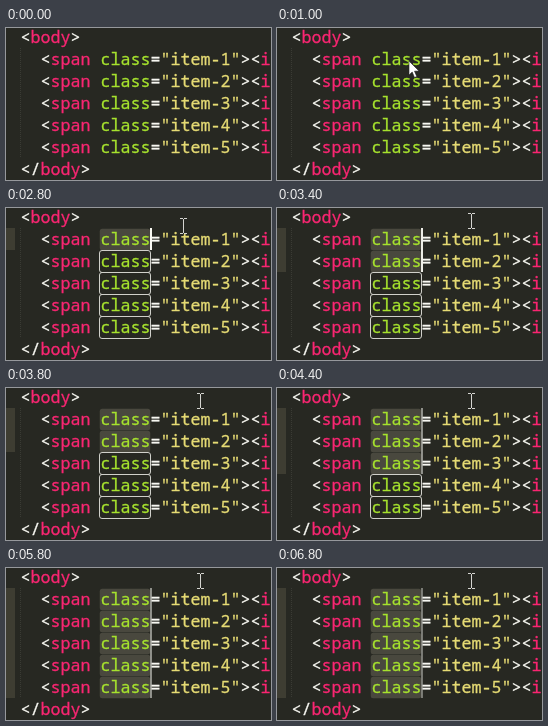
An HTML page with a canvas for the animation above (7000 ms loop, 265 by 152 pixels).

```html
<!DOCTYPE html>
<html lang="en">
<head>
<meta charset="utf-8">
<title>Multiple selection</title>
<style>
html, body { margin: 0; width: 100%; height: 100%; overflow: hidden; background: #272822; }
canvas { display: block; width: 265px; height: 152px; }
</style>
</head>
<body>
<canvas id="stage"></canvas>
<script>
const W = 265, H = 152, LOOP = 7000, STEP = 200;
const COL = 10, ROW = 22, LEFT = 14, TOP = -2;
const BG = '#272822', WHITE = '#f8f8f2', PINK = '#f92672', GREEN = '#a6e22e',
      YELLOW = '#e6db74', SELECT = '#49483e', ACTIVE = '#3e3d32', GUIDE = '#3a3b34';

const CLICK = 1400;
const PICKS = [2800, 3200, 4000, 4600, 5400];
const BLINK = [1, 0.95, 0.5, 0, 0, 0.35, 0.8, 0.4];
const PATH = [[400, 150, 35], [1000, 132, 33], [1400, 124, 31], [1600, 125, 31],
              [1800, 124, 32], [2200, 124, 32], [3000, 194, 13]];

const canvas = document.getElementById('stage');
const ctx = canvas.getContext('2d');
const ratio = window.devicePixelRatio || 1;
canvas.width = W * ratio;
canvas.height = H * ratio;
ctx.scale(ratio, ratio);

const colX = c => LEFT + c * COL;
const rowY = r => TOP + r * ROW;

function rect(x, y, w, h, color) {
  ctx.fillStyle = color;
  ctx.fillRect(x, y, w, h);
}

function line(row, col, parts) {
  for (const [text, color] of parts) {
    const x = colX(col) + 0.5, y = rowY(row) + 17;
    ctx.fillStyle = ctx.strokeStyle = color;
    ctx.fillText(text, x, y);
    ctx.strokeText(text, x, y);
    col += text.length;
  }
}

function drawText() {
  ctx.font = '16.667px "Noto Sans Mono", "DejaVu Sans Mono", monospace';
  ctx.lineWidth = 0.3;
  line(0, 0, [['<', WHITE], ['body', PINK], ['>', WHITE]]);
  for (let r = 1; r <= 5; r++) {
    line(r, 2, [['<', WHITE], ['span', PINK], [' class', GREEN], ['=', WHITE],
                [`"item-${r}"`, YELLOW], ['><', WHITE], ['i', PINK]]);
  }
  line(6, 0, [['</', WHITE], ['body', PINK], ['>', WHITE]]);
}

function caret(col, row, level, width) {
  ctx.globalAlpha = level;
  rect(colX(col), rowY(row), width, ROW, WHITE);
  ctx.globalAlpha = 1;
}

function pointerAt(t) {
  let i = 0;
  while (i < PATH.length - 1 && PATH[i + 1][0] <= t) i++;
  const [t0, x0, y0] = PATH[i];
  if (i === PATH.length - 1) return [x0, y0];
  const [t1, x1, y1] = PATH[i + 1];
  const k = (t - t0) / (t1 - t0);
  return [x0 + (x1 - x0) * k, y0 + (y1 - y0) * k];
}

function arrow(x, y) {
  ctx.save();
  ctx.translate(x, y);
  ctx.beginPath();
  ctx.moveTo(0, 0);
  for (const [px, py] of [[0, 14], [3.2, 11], [5.5, 16.5], [7.8, 15.5], [5.5, 10.2], [10, 10]]) {
    ctx.lineTo(px, py);
  }
  ctx.closePath();
  ctx.fillStyle = '#fff';
  ctx.fill();
  ctx.lineWidth = 0.6;
  ctx.strokeStyle = '#222';
  ctx.stroke();
  ctx.restore();
}

function beam(x, y) {
  const color = '#d4d4d0';
  rect(x, y - 7, 1, 14, color);
  for (const dy of [-8, 7]) {
    rect(x - 3, y + dy, 3, 1, color);
    rect(x + 1, y + dy, 3, 1, color);
  }
}

// Neighbouring boxes share their one-pixel border.
function boxPath(row, inset) {
  ctx.beginPath();
  ctx.roundRect(colX(8) - 1 + inset, rowY(row) + inset,
                5 * COL + 2 - 2 * inset, ROW + 1 - 2 * inset, 2.5);
}

function draw(t) {
  const picked = PICKS.filter(p => p <= t).length;
  const reset = picked ? PICKS[picked - 1] : CLICK;
  const level = BLINK[Math.floor((t - reset) / STEP)] || 0;
  const clicked = t >= CLICK;

  rect(0, 0, W, H, BG);
  if (clicked) rect(0, rowY(1), 9, ROW * Math.max(1, picked), ACTIVE);
  for (let y = rowY(1); y < rowY(6); y += 2) rect(LEFT, y, 1, 1, GUIDE);

  if (picked) {
    for (let r = 1; r <= 5; r++) {
      if (r <= picked) {
        boxPath(r, 0.75);
        ctx.fillStyle = SELECT;
        ctx.fill();
      } else {
        boxPath(r, 0.5);
        ctx.strokeStyle = '#d0d0ca';
        ctx.lineWidth = 1;
        ctx.stroke();
      }
    }
  }

  drawText();

  if (picked) {
    for (let r = 1; r <= picked; r++) caret(13, r, level, 2);
  } else if (clicked) {
    for (let x = colX(3); x < colX(7); x += 2) rect(x, rowY(2), 1, 1, WHITE);
    caret(11, 1, level, 1);
  }

  if (t >= PATH[0][0]) {
    const [x, y] = pointerAt(t).map(Math.round);
    (t < 2600 ? arrow : beam)(x, y);
  }
}

const start = performance.now();
function tick() {
  const t = (performance.now() - start) % LOOP;
  draw(Math.floor(t / STEP) * STEP);
  requestAnimationFrame(tick);
}
tick();
</script>
</body>
</html>
```
